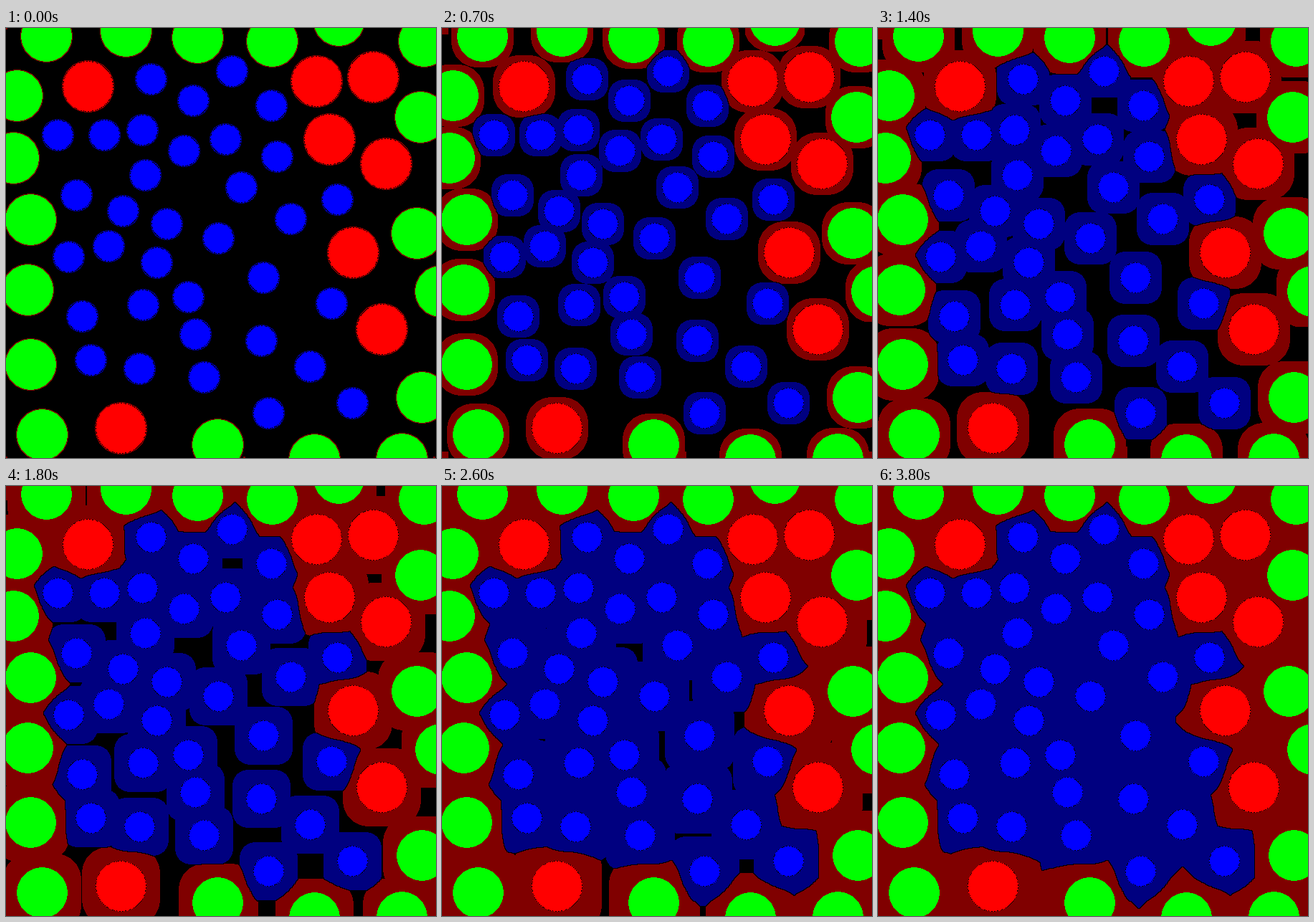
Write an HTML page with a canvas that moves like this. It is 600x600 px and loops after 3.9 s.

```html
<!DOCTYPE html>
<html>
<head>
<meta charset="utf-8">
<style>
html, body { margin: 0; width: 100%; height: 100%; overflow: hidden; background: #000; }
canvas { display: block; width: 600px; height: 600px; }
</style>
</head>
<body>
<canvas id="stage" width="600" height="600"></canvas>
<script>
const N = 600, STEP = 100, FRAMES = 39;
const BLUE = 1, RED = 2, BLOCKED = 3;

const blues = [
  [202,71],[315,60],[261,101],[370,108],[72,149],[137,149],[190,142],[248,171],
  [306,155],[378,179],[194,205],[328,222],[98,233],[163,255],[224,273],[296,293],
  [397,266],[462,239],[87,319],[143,304],[210,327],[191,386],[254,375],[359,348],
  [454,384],[106,402],[264,427],[356,436],[118,463],[186,475],[276,487],[424,472],
  [366,537],[483,523]
];
const reds = [[114,81],[433,74],[512,68],[451,155],[530,189],[484,313],[524,420],[160,558]];
const greens = [
  [56,11],[167,4],[267,13],[371,18],[464,-11],[583,18],[15,94],[10,181],[34,267],
  [30,365],[34,469],[50,567],[295,581],[430,602],[552,601],[580,515],[606,367],
  [573,286],[578,124]
];
const specks = [[0,0],[0,599],[597,599],[332,599]];

const rgb = (r, g, b) => (255 << 24 | b << 16 | g << 8 | r) >>> 0;
const BLACK = rgb(0, 0, 0);
const shade = [BLACK, rgb(0, 0, 128), rgb(128, 0, 0), BLACK];

const label = new Uint8Array(N * N);
const age = new Uint8Array(N * N).fill(255);
const core = new Uint32Array(N * N);
const queue = [];

function seed(i, kind, color) {
  label[i] = kind;
  age[i] = 0;
  core[i] = color;
  queue.push(i);
}

function disc([cx, cy], r, kind, color, dotted) {
  for (let y = Math.max(0, cy - r); y <= Math.min(N - 1, cy + r); y++) {
    for (let x = Math.max(0, cx - r); x <= Math.min(N - 1, cx + r); x++) {
      const d = Math.hypot(x - cx, y - cy);
      if (d > r + 0.3) continue;
      const dot = dotted && d > r - 0.5 && ((x >> 1) + (y >> 1)) & 1;
      seed(y * N + x, kind, dot ? BLACK : color);
    }
  }
}

function around(i, visit) {
  const x = i % N, y = (i - x) / N;
  for (let v = Math.max(0, y - 1); v <= Math.min(N - 1, y + 1); v++)
    for (let u = Math.max(0, x - 1); u <= Math.min(N - 1, x + 1); u++)
      visit(v * N + u);
}

// Both kinds spread by one pixel per step and stop where they meet.
function grow() {
  for (let q = 0; q < queue.length; q++) {
    const i = queue[q], kind = label[i], rival = 3 - kind;
    around(i, j => {
      if (label[j]) return;
      let met = false;
      around(j, n => { if (label[n] === rival) met = true; });
      label[j] = met ? BLOCKED : kind;
      age[j] = age[i] + 1;
      if (!met) queue.push(j);
    });
  }
}

blues.forEach(p => disc(p, 21, BLUE, rgb(0, 0, 255), true));
reds.forEach(p => disc(p, 35, RED, rgb(255, 0, 0), true));
greens.forEach(p => disc(p, 35, RED, rgb(0, 255, 0), false));
specks.forEach(([x, y]) => seed(y * N + x, RED, shade[RED]));
grow();

const ctx = document.getElementById("stage").getContext("2d");
const image = ctx.createImageData(N, N);
const pixels = new Uint32Array(image.data.buffer);
let shown = -1;

function draw(k) {
  if (k === shown) return;
  shown = k;
  for (let i = 0; i < pixels.length; i++)
    pixels[i] = core[i] || (age[i] <= k + 1 ? shade[label[i]] : BLACK);
  ctx.putImageData(image, 0, 0);
}

const start = performance.now();
function tick() {
  const t = Math.max(0, performance.now() - start);
  draw(Math.floor(t / STEP) % FRAMES);
  requestAnimationFrame(tick);
}
tick();
</script>
</body>
</html>
```
